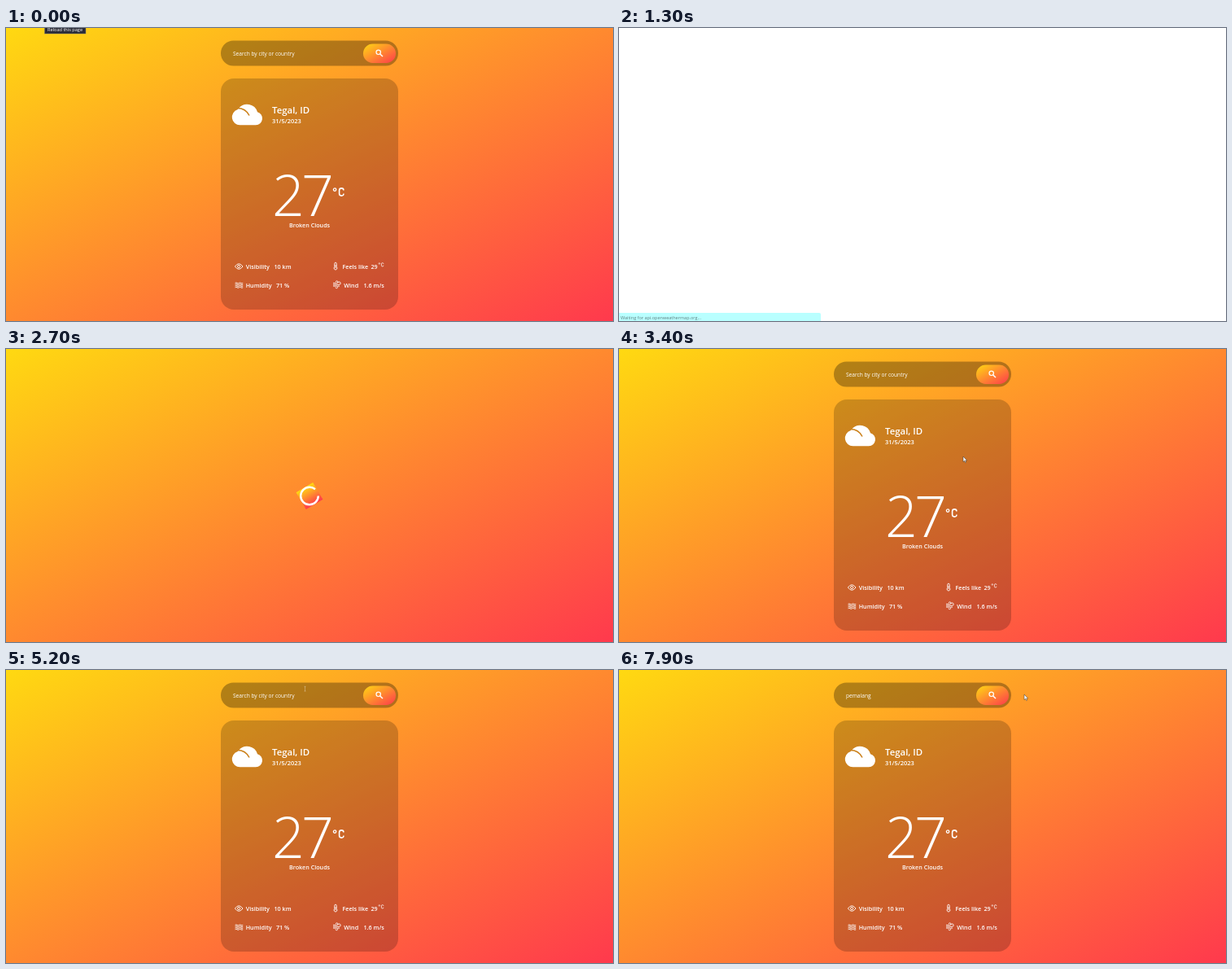
Recreate the animation shown at these times as an HTML page. Size 746 by 360 pixels, loop 8 s.

```html
<!DOCTYPE html>
<html lang="en">
<head>
<meta charset="utf-8">
<title>Weather</title>
<style>
html, body { margin: 0; width: 100%; height: 100%; overflow: hidden; background: #fff; }
svg { display: block; width: 100%; height: 100%; }
text { font: 600 7.2px "Open Sans", "Noto Sans", sans-serif; fill: #fff; white-space: pre; }
.thin { font-weight: 400; font-size: 6.6px; }
.line { fill: none; stroke: #fff; }
</style>
</head>
<body>
<svg viewBox="0 0 746 360" preserveAspectRatio="none">
  <defs>
    <linearGradient id="sun" x2="1" y2="1">
      <stop stop-color="#ffd911"/><stop offset="1" stop-color="#ff394d"/>
    </linearGradient>
    <linearGradient id="side">
      <stop stop-color="#ffd911"/><stop offset="1" stop-color="#ff394d"/>
    </linearGradient>
    <mask id="gap">
      <rect x="270" y="85" width="55" height="45" fill="#fff"/>
      <path d="M282 98.6Q294 97.5 299 107.5" fill="none" stroke="#000" stroke-width="1.6"/>
    </mask>
    <g id="celsius" class="line">
      <circle cx="2.6" cy="2.6" r="1.7" stroke-width="1.3"/>
      <path d="M13.4 3.6V3.2Q13.4 .9 10.8 .9T8.1 3.4V7.6Q8.1 10.1 10.8 10.1T13.4 7.8V7.4" stroke-width="1.6"/>
    </g>
  </defs>

  <g id="page">
    <rect width="746" height="360" fill="url(#sun)"/>

    <g id="spinner">
      <rect x="-12" y="-12" width="24" height="24" fill="url(#side)"/>
      <circle class="line" r="10.8" stroke-width="2.4" pathLength="360" stroke-dasharray="310 50" transform="rotate(-59)"/>
    </g>

    <g id="app">
      <rect x="264" y="15.5" width="218" height="31" rx="15.5" fill-opacity=".3"/>
      <rect x="439" y="19.5" width="40" height="23.5" rx="11.75" fill="url(#sun)"/>
      <g class="line" stroke-width="1.2">
        <circle cx="457.7" cy="29.8" r="2.7"/>
        <path d="M459.8 31.9L463 35.1" stroke-width="1.4"/>
      </g>
      <text id="query" class="thin" x="279" y="34"></text>
      <rect id="caret" y="26" width="1" height="10" fill="#fff" fill-opacity=".85"/>

      <rect x="264" y="62" width="218" height="284" rx="16" fill-opacity=".2"/>
      <path mask="url(#gap)" fill="#fff" d="M287.5 119.3A9.8 9.8 0 0 1 284.5 100.2L286 98.6A13.3 13.3 0 0 1 309 103.2A8.2 8.2 0 0 1 307 119.3Z"/>
      <text x="327" y="105" font-size="11.4" style="font-size:11.4px">Tegal, ID</text>
      <text x="327" y="117.3" style="font-size:7.5px">31/5/2023</text>
      <text x="327" y="231" style="font-size:70px;font-weight:300;letter-spacing:-4px">27</text>
      <use href="#celsius" x="401.5" y="196"/>
      <text x="348" y="245">Broken Clouds</text>

      <g class="line" stroke-width=".9">
        <path d="M281.4 293Q286.2 286.4 291 293Q286.2 299.6 281.4 293Z"/>
        <circle cx="286.2" cy="293" r="1.6"/>
        <path id="waves"/>
        <path d="M403.8 293.6V289.4A1.2 1.2 0 0 1 406.2 289.4V293.6A1.9 1.9 0 1 1 403.8 293.6ZM405 291V295"/>
        <path d="M402 313.4H406.6A1.3 1.3 0 1 0 405.3 312.1M402 315.3H409.4A1.7 1.7 0 1 0 407.8 313.2M402 317.1H406.2A1.3 1.3 0 1 1 405 318.5M407.6 317.1H410"/>
      </g>
      <text x="294.7" y="295.6">Visibility</text>
      <text x="329.5" y="295.6">10 km</text>
      <text x="294.7" y="318.7">Humidity</text>
      <text x="332" y="318.7">71 %</text>
      <text x="413.5" y="295.6">Feels like</text>
      <text x="448.5" y="295.6">29</text>
      <use href="#celsius" transform="translate(457.6 288.2) scale(.47)"/>
      <text x="415.3" y="318.7">Wind</text>
      <text x="439.5" y="318.7">1.6 m/s</text>
    </g>
  </g>

  <g id="tip">
    <rect x="47.5" y="-5" width="50.5" height="12" fill="#2b2c38" stroke="#77756b" stroke-width=".5"/>
    <text class="thin" x="51" y="3.9" style="font-size:5.6px">Reload this page</text>
  </g>
  <g id="status">
    <path d="M0 350H246Q248 350 248 352V360H0Z" fill="#b9ffff"/>
    <text class="thin" x="2" y="357.6" style="font-size:5.5px;fill:#5f7f80">Waiting for api.openweathermap.org...</text>
  </g>
  <path id="arrow" d="M0 0V6.6L1.5 5.3L2.6 7.6L3.6 7.1L2.6 4.9H4.6Z" fill="#fff" stroke="#333" stroke-width=".5"/>
  <path id="beam" class="line" d="M366.5 20.3H368.5M367.5 20.3V26M366.5 26H368.5" stroke-width=".6" stroke-opacity=".5"/>
</svg>
<script>
const LOOP = 8000, STEP = 100;
const $ = id => document.getElementById(id);
const show = (id, on) => $(id).style.display = on ? "" : "none";

const typed = [[0, "Search by city or country"], [5600, "p"], [6300, "pem"], [6400, "pema"],
  [6600, "pemal"], [6700, "pemalan"], [6900, "pemalang"]];
// time, x, y of the mouse pointer
const track = [[2800, 224, 42], [3300, 418, 130], [3400, 423, 132], [4100, 423, 132], [4400, 367, 21]];

$("waves").setAttribute("d", [313.4, 315.2, 317, 318.8].map(y =>
  `M281.6 ${y}q1.2 -1 2.4 0t2.4 0t2.4 0t2.4 0`).join(""));

function pointer(t) {
  if (t >= 7900) return [498, 30];
  const i = track.findIndex(k => k[0] > t);
  if (i < 1) return null;
  const [a, b] = [track[i - 1], track[i]], f = (t - a[0]) / (b[0] - a[0]);
  return [1, 2].map(n => a[n] + (b[n] - a[n]) * f);
}

function draw(t) {
  const loading = t >= 1600 && t < 3400;
  show("page", t < 1300 || t >= 1600);
  show("app", !loading);
  show("spinner", loading);
  show("tip", t < 1300);
  show("status", t >= 1300 && t < 2000);
  $("spinner").setAttribute("transform", `translate(373 180.5) rotate(${8 + (t - 1600) * 0.374})`);

  const text = typed.filter(k => k[0] <= t).pop()[1];
  if ($("query").textContent !== text) $("query").textContent = text;
  show("caret", t >= 4400 && t < 5200 || t >= 5600 && t < 7100);
  const end = t < 5600 || loading ? 0 : $("query").getComputedTextLength();
  $("caret").setAttribute("x", Math.floor(279 + end));

  const p = pointer(t);
  show("arrow", p);
  if (p) $("arrow").setAttribute("transform", `translate(${p})`);
  show("beam", t >= 4400 && t < 7900);
}

const start = performance.now();
function frame() {
  const t = (performance.now() - start) % LOOP;
  draw(Math.floor(t / STEP) * STEP);
  requestAnimationFrame(frame);
}
frame();
</script>
</body>
</html>
```
